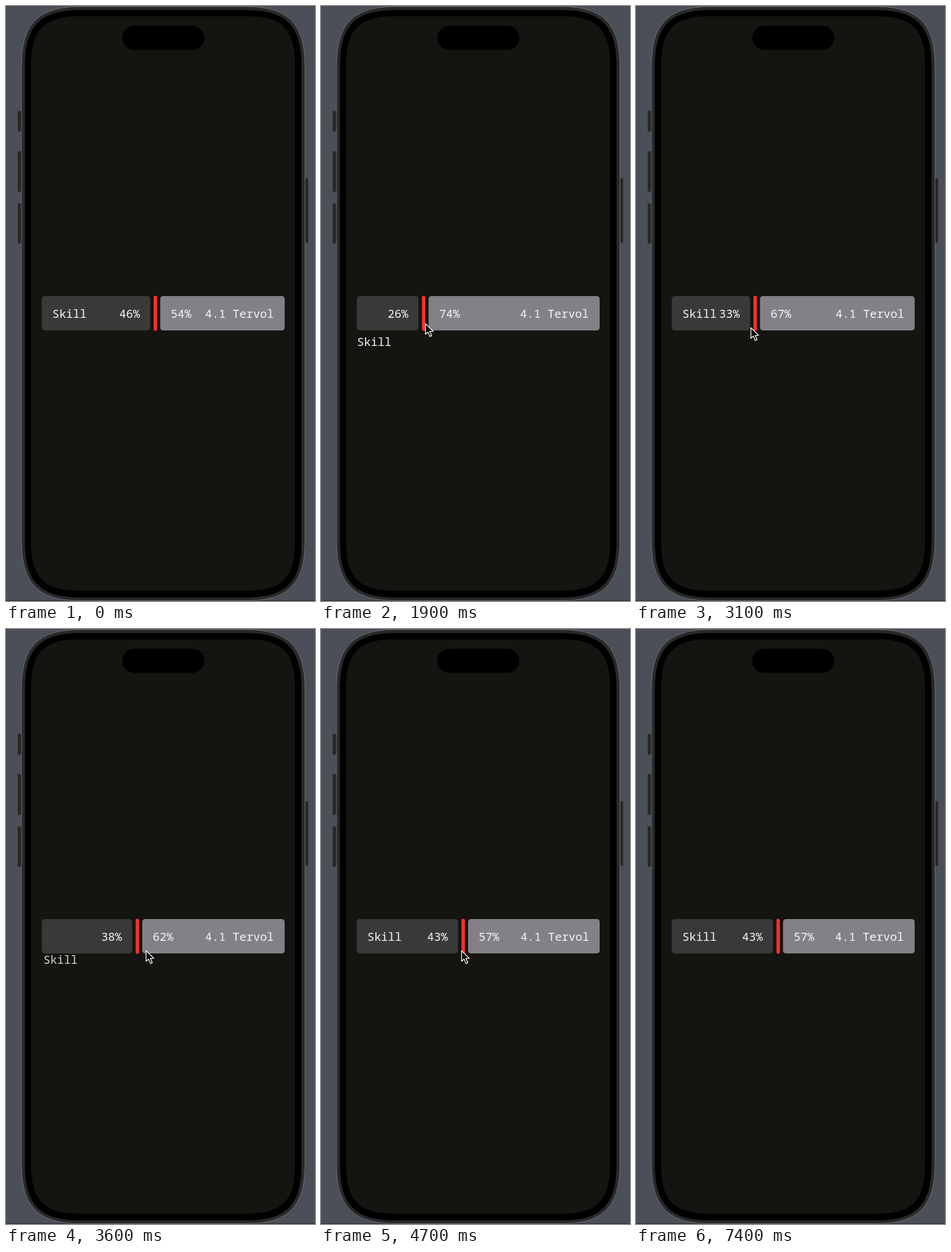
An HTML page that plays this animation: 540 by 1038 pixels, repeating every 7.5 s.

```html
<!DOCTYPE html>
<html lang="en">
<head>
<meta charset="utf-8">
<title>Split bar</title>
<style>
  html, body { margin: 0; width: 100%; height: 100%; overflow: hidden; background: #4b4f57; }
  svg { display: block; width: 100%; height: 100%; }
  text { font: 400 20px "Noto Sans Mono", "DejaVu Sans Mono", monospace; fill: #f6f6f6; white-space: pre; }
  .button { fill: #262626; stroke: #3b3d41; }
</style>
</head>
<body>
<svg viewBox="0 0 540 1038">
  <rect y="1037" width="540" height="1" fill="#26282b"/>
  <g class="button">
    <rect x="20.5" y="183" width="8" height="36"/>
    <rect x="20.5" y="253.5" width="8" height="70.5"/>
    <rect x="20.5" y="344.5" width="8" height="70"/>
    <rect x="520" y="300.5" width="8" height="112.5"/>
  </g>
  <path id="shell" fill="#29292b" stroke="#707173"/>
  <path id="bezel"/>
  <path id="screen" fill="#141410"/>
  <rect x="203" y="34.5" width="143.5" height="42" rx="21"/>

  <rect id="left" x="62.5" y="506" height="60" rx="5" fill="#393939"/>
  <rect id="right" y="506" height="60" rx="5" fill="#838087"/>
  <rect id="handle" y="505.5" width="6" height="61" rx="2.5" fill="#fb302b"/>
  <text id="leftPct" y="543.5"></text>
  <text id="rightPct" y="543.5"></text>
  <text id="leftName">Skill</text>
  <text id="rightName" text-anchor="end">4.1 Tervol</text>
  <path id="cursor" d="M.7 1.2V19.8L5 15.8L8.3 23.5L11.5 22.1L8.2 14.6H14.2Z"
        fill="#000" stroke="#fff" stroke-width="1.4" stroke-linejoin="round"/>
</svg>
<script>
  const LOOP = 7500, STEP = 100;
  const $ = id => document.getElementById(id);
  const set = (id, attrs) => {
    for (const k in attrs) $(id).setAttribute(k, attrs[k]);
  };
  const lerp = (a, b, u) => a + (b - a) * u;
  const ease = (t, from, to) => {
    const u = Math.min(1, Math.max(0, (t - from) / (to - from)));
    return (1 - Math.cos(Math.PI * u)) / 2;
  };

  // Rounded rectangle whose corners blend gradually into the sides.
  function smoothRect(l, t, r, b, radius) {
    const e = radius * 1.28, c = radius * 0.355;
    return `M${l} ${t + e}C${l} ${t + c} ${l + c} ${t} ${l + e} ${t}`
      + `H${r - e}C${r - c} ${t} ${r} ${t + c} ${r} ${t + e}`
      + `V${b - e}C${r} ${b - c} ${r - c} ${b} ${r - e} ${b}`
      + `H${l + e}C${l + c} ${b} ${l} ${b - c} ${l} ${b - e}Z`;
  }
  set("shell", { d: smoothRect(27, 1, 522.5, 1037.5, 82) });
  set("bezel", { d: smoothRect(33, 7, 516.5, 1032, 76) });
  set("screen", { d: smoothRect(44, 18, 505, 1020, 65) });

  // Turning points of the drag: [time, handle centre].
  const turns = [
    [1100, 261], [1797, 168], [2384, 322], [3460, 170],
    [3780, 318], [4100, 302.5], [4200, 302.5], [4550, 248.5]
  ];
  const handleAt = t => turns.slice(1).reduce(
    (x, [end, to], i) => lerp(x, to, ease(t, turns[i][0], end)), turns[0][1]);

  // Times at which a condition on the handle flips, starting from false.
  function flips(test) {
    const times = [];
    for (let t = 0; t < LOOP; t += 2) {
      if (test(handleAt(t)) !== (times.length % 2 === 1)) times.push(t);
    }
    return times;
  }
  const leftFlips = flips(x => x < 200);
  const rightFlips = flips(x => x > 296);

  // Critically damped spring, settling in about 350 ms.
  function spring(ms) {
    const k = Math.max(0, ms) * 0.018;
    return 1 - (1 + k) * Math.exp(-k);
  }

  // A name springs below its bar when the bar gets too narrow.
  function placeName(id, x, shift, times, t) {
    const p = times.reduce((sum, at, i) => sum + (i % 2 ? -1 : 1) * spring(t - at), 0);
    set(id, {
      x: x + shift * Math.pow(Math.max(0, p), 0.6),
      y: 543.5 + 49.5 * p,
      opacity: 1 - p * (1 - p)
    });
  }

  function cursorAt(t) {
    if (t < 1000) {
      const u = ease(t, 200, 1000);
      return [lerp(18, 257.5, u) + 180 * Math.sin(Math.PI * u), lerp(956, 553, u)];
    }
    const nudge = ease(t, 5200, 5500), exit = ease(t, 6600, 7100);
    return [
      handleAt(t + 25) - 3.5 + 6 * nudge - 174 * exit,
      553 + 7 * ease(t, 1900, 2300) + 11 * nudge + 182 * exit
    ];
  }

  function draw(t) {
    const mid = handleAt(t);
    const leftEnd = mid - 9, rightStart = mid + 8.5;
    const pct = Math.round((mid - 68) / 4.24);

    set("left", { width: leftEnd - 62.5 });
    set("right", { x: rightStart, width: 487 - rightStart });
    set("handle", { x: mid - 3 });
    set("leftPct", { x: leftEnd - 54 });
    set("rightPct", { x: rightStart + 18.5 });
    $("leftPct").textContent = pct + "%";
    $("rightPct").textContent = 100 - pct + "%";

    placeName("leftName", 81, -18, leftFlips, t);
    placeName("rightName", 468, 18, rightFlips, t);

    set("cursor", {
      transform: `translate(${cursorAt(t)})`,
      visibility: t >= 300 && t < 7400 ? "visible" : "hidden"
    });
  }

  const start = performance.now();
  function tick(now) {
    const t = Math.max(0, now - start) % LOOP;
    draw(Math.floor(t / STEP) * STEP);
    requestAnimationFrame(tick);
  }
  draw(0);
  requestAnimationFrame(tick);
</script>
</body>
</html>
```
